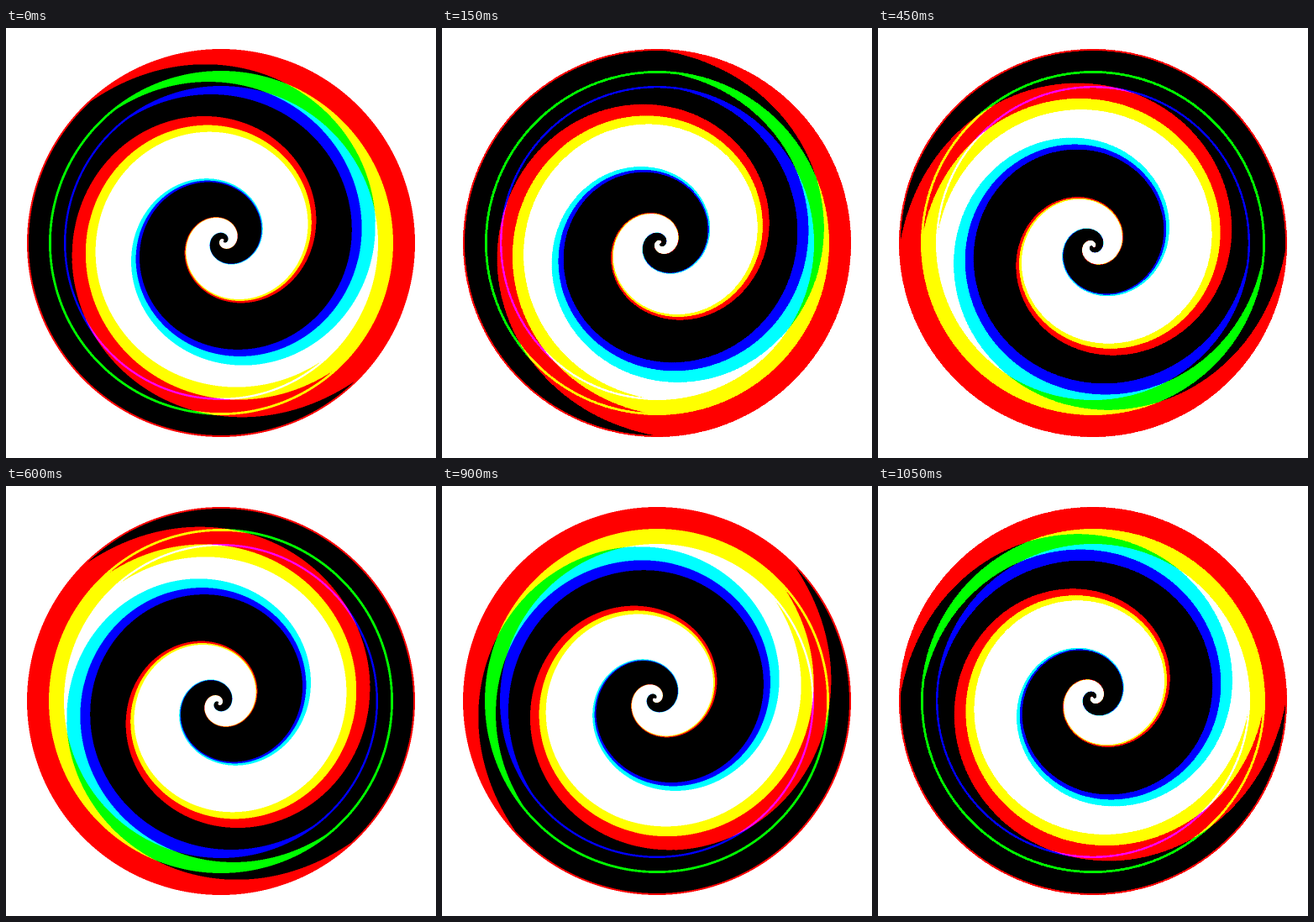
Write an HTML page with a canvas that moves like this. It is 512 by 512 pixels and loops after 1200 ms.

```html
<!DOCTYPE html>
<html>
<head>
<meta charset="utf-8">
<style>
  html, body { margin: 0; width: 100%; height: 100%; overflow: hidden; background: #fff; }
  canvas { display: block; }
</style>
</head>
<body>
<canvas id="stage" width="512" height="512"></canvas>
<script>
const SIZE = 512, CENTER = SIZE / 2, SCALE = 2;
const STEP_MS = 150, STEPS = 8;
const EYE = { x: 3.2, y: -2.7 }; // spiral centre relative to the disc centre
const EYE_SIZE = 3;              // the winding stops inside this radius

// One spiral per colour channel; lag is the winding offset in degrees.
const CHANNELS = [
  { radius: 231, rim: 2, lag: 0 },
  { radius: 205, rim: 2.8, lag: 18 },
  { radius: 187, rim: 2.4, lag: 32 }
];

// Angle of the white arm's outer edge at relative radius s:
// a logarithmic spiral seen through a lens, easing out near the rim.
function windingAngle(s, lag) {
  const knee = 0.788, d = s - knee;
  const angle = d < 0
    ? 173.3 * Math.log(Math.tan(Math.PI / 2 * s / 1.04) / 0.846)
    : 187 + 757 * d - 3300 * d ** 3;
  return angle - lag * (1 - s ** 8);
}

function isLit(channel, discRadius, eyeRadius, angle) {
  if (discRadius > channel.radius) return false;
  if (discRadius > channel.radius - channel.rim) return true;
  const turns = (angle - windingAngle(eyeRadius / channel.radius, channel.lag)) / 360;
  return turns - Math.floor(turns) < 0.5;
}

function makeDisc() {
  const n = SIZE * SCALE;
  const disc = document.createElement('canvas');
  disc.width = disc.height = n;
  const ctx = disc.getContext('2d');
  const image = ctx.createImageData(n, n);
  for (let row = 0, p = 0; row < n; row++) {
    for (let col = 0; col < n; col++, p += 4) {
      const x = (col + 0.5) / SCALE - CENTER;
      const y = (row + 0.5) / SCALE - CENTER;
      const discRadius = Math.hypot(x, y);
      if (discRadius > CHANNELS[0].radius) continue;
      const eyeRadius = Math.hypot(x - EYE.x, y - EYE.y, EYE_SIZE);
      const angle = Math.atan2(EYE.y - y, x - EYE.x) * 180 / Math.PI;
      CHANNELS.forEach((channel, i) => {
        image.data[p + i] = isLit(channel, discRadius, eyeRadius, angle) ? 255 : 0;
      });
      image.data[p + 3] = 255;
    }
  }
  ctx.putImageData(image, 0, 0);
  return disc;
}

const disc = makeDisc();
const ctx = document.getElementById('stage').getContext('2d');

function draw(now) {
  const step = Math.floor(now / STEP_MS) % STEPS;
  ctx.setTransform(1, 0, 0, 1, 0, 0);
  ctx.fillStyle = '#fff';
  ctx.fillRect(0, 0, SIZE, SIZE);
  ctx.translate(CENTER, CENTER);
  ctx.rotate(step * 2 * Math.PI / STEPS);
  ctx.drawImage(disc, -CENTER, -CENTER, SIZE, SIZE);
}

const start = performance.now();
function loop() {
  draw(performance.now() - start);
  requestAnimationFrame(loop);
}
loop();
</script>
</body>
</html>
```
